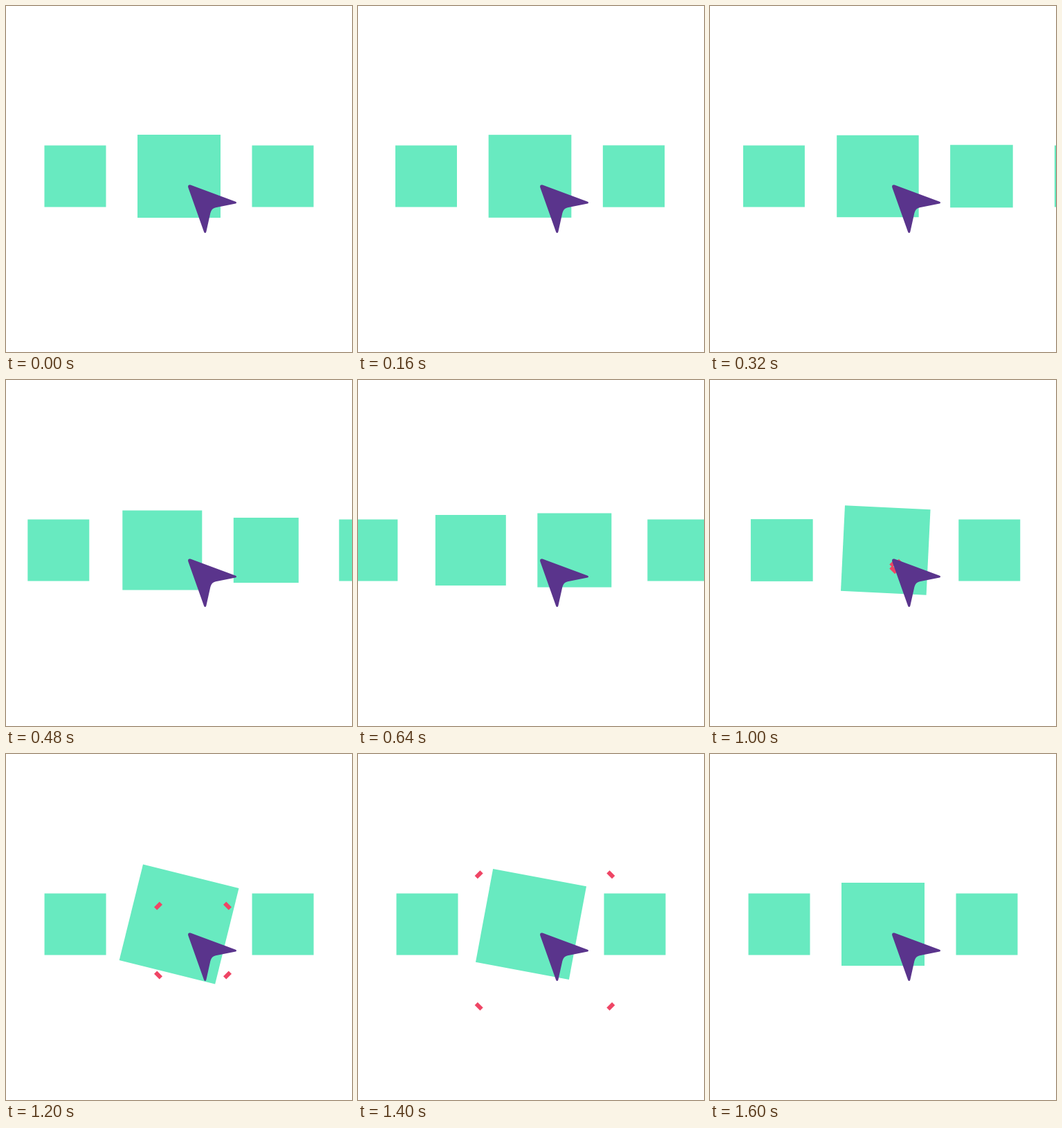
Animation, 500 px wide and 500 px high, one loop 1680 ms. Source, as an HTML page:

```html
<!DOCTYPE html>
<html lang="en">
<head>
<meta charset="utf-8">
<title>Carousel click</title>
<style>
  html, body { margin: 0; width: 100%; height: 100%; overflow: hidden; background: #fff; }
  svg { display: block; width: 100%; height: 100%; }
</style>
</head>
<body>
<svg viewBox="0 0 500 500">
  <g id="tiles" fill="#68eac0"></g>
  <g id="sparks" fill="#ef4565"></g>
  <path fill="#5a348c" d="M266.5 258.6 L331.8 282.7 Q334.4 284.2 331.8 285.5 L303 291.2
    Q297 292.5 295.4 299 L289.3 326.4 Q287.8 329.6 286.1 326.4 L263.2 262 Q262.5 257.5 266.5 258.6 Z"/>
</svg>
<script>
const LOOP = 1680, STEP = 40;
const SMALL = 89, LARGE = 120, GAP = 150;
const EASE = 0.808;

function addRects(id, count, w, h) {
  const group = document.getElementById(id);
  return Array.from({ length: count }, () => {
    const rect = document.createElementNS('http://www.w3.org/2000/svg', 'rect');
    const box = { x: -w / 2, y: -h / 2, width: w, height: h };
    for (const key in box) rect.setAttribute(key, box[key]);
    return group.appendChild(rect);
  });
}

const tiles = addRects('tiles', 4, 1, 1);
const sparks = addRects('sparks', 4, 11, 6);
const sparkGroup = document.getElementById('sparks');

// Symmetric cubic-bezier(EASE, 0, 1 - EASE, 1), solved by bisection
function ease(x) {
  if (x <= 0) return 0;
  if (x >= 1) return 1;
  let lo = 0, hi = 1;
  for (let i = 0; i < 30; i++) {
    const s = (lo + hi) / 2, r = 1 - s;
    const bx = 3 * EASE * s * r * r + 3 * (1 - EASE) * s * s * r + s * s * s;
    if (bx < x) lo = s; else hi = s;
  }
  return lo * lo * (3 - 2 * lo);
}

const ramp = (t, from, to) => ease((t - from) / (to - from));

function place(el, x, y, angle, scale = 1) {
  el.setAttribute('transform', `translate(${x} ${y}) rotate(${angle}) scale(${scale})`);
}

function draw(t) {
  const slide = ramp(t, 0, 1240);
  const pop = ramp(t, 836, 1236) - ramp(t, 1247, 1600);
  tiles.forEach((tile, i) => {
    const focus = i === 1 ? 1 - slide : i === 2 ? slide : 0;
    const p = i === 2 ? pop : 0;
    const size = (SMALL + (LARGE - SMALL) * focus) * (1 + 0.19 * p);
    place(tile, 100 + GAP * (i - slide), 246, 14 * p, size);
  });

  const d = 100 * ramp(t, 800, 1600);
  sparks.forEach((spark, i) => {
    const sx = i % 2 ? 1 : -1, sy = i < 2 ? -1 : 1;
    place(spark, 270 + sx * d, 269.5 + sy * d, -45 * sx * sy);
  });
  sparkGroup.style.display = t > 800 && t < 1600 ? '' : 'none';
}

const start = performance.now();
function tick() {
  const t = (performance.now() - start) % LOOP;
  draw(Math.floor(t / STEP) * STEP);
  requestAnimationFrame(tick);
}
tick();
</script>
</body>
</html>
```
